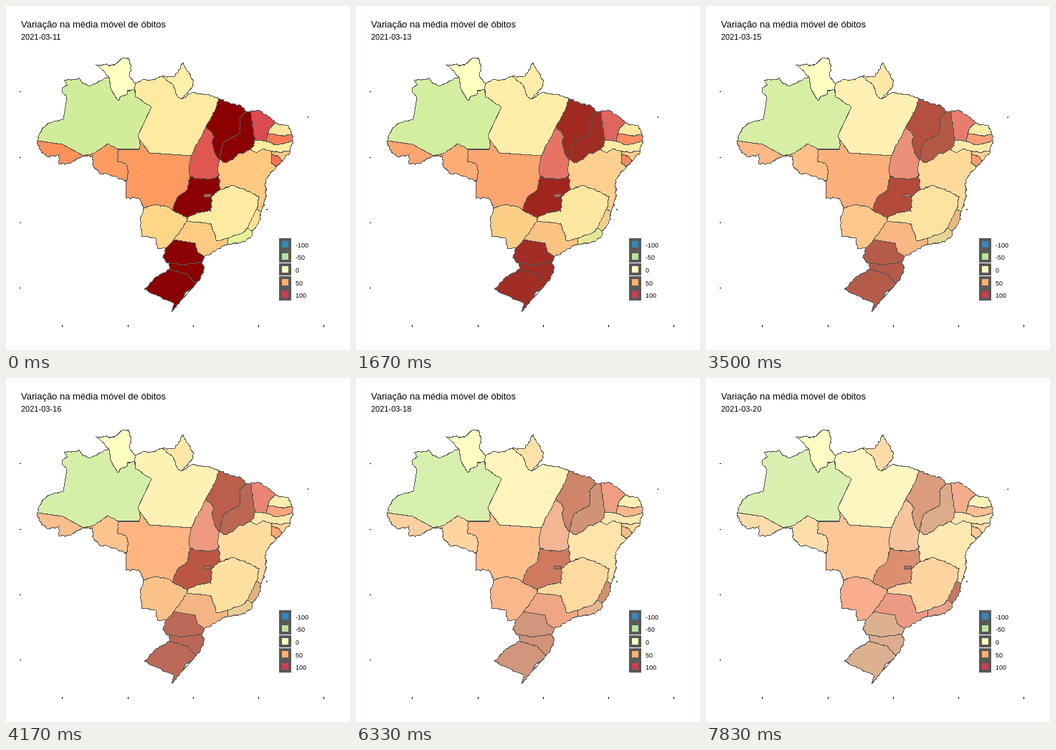
Animation of 480 by 480 pixels, one loop 8000 ms. Source, as an HTML page:

```html
<!DOCTYPE html>
<html lang="pt">
<head>
<meta charset="utf-8">
<style>
html, body { margin: 0; width: 100%; height: 100%; overflow: hidden; background: #fff; }
svg { display: block; width: 100%; height: 100%; }
text { font-family: "Liberation Sans", Arial, sans-serif; fill: #000; }
</style>
</head>
<body>
<svg id="stage" viewBox="0 0 480 480">
  <text x="21" y="30" font-size="13">Variação na média móvel de óbitos</text>
  <text id="date" x="21" y="47" font-size="11"></text>
  <g id="map" shape-rendering="crispEdges"></g>
  <g id="guides" shape-rendering="crispEdges"></g>
</svg>
<script>
// Points where borders meet, each named by a letter.
const corners = `A43,188 B50,205 C108,209 D143,98 E180,117 F180,108 G218,98 H247,79 I245,130
  J297,129 K279,168 L259,209 M187,187 N156,200 O168,244 P192,282 Q232,285 R257,238 S297,237
  T298,214 U335,147 V341,147 W347,187 X341,200 Y376,163 Z365,178 a363,189 b399,179 c400,188
  d397,202 e369,202 f386,216 g371,207 h377,225 i356,287 j350,283 k298,257 l253,295 m252,301
  n309,324 o336,310 p344,314 q309,333 r277,350 s234,326 t223,338 u227,359 v274,357 w265,388
  x228,367 y231,427`;

// Key bends on the way from one corner to the next; other borders run directly.
const bends = {
  AD: '50,172 62,163 80,158 85,128 79,121 79,114 86,110 81,104 97,103 102,100 107,108 116,112 133,104',
  DF: '132,87 126,82 152,82 164,72 171,73 175,84 172,98',
  DE: '147,117 156,132 161,126 168,124 170,118',
  EM: '181,127 203,141 184,181',
  MN: '186,200',
  NC: '143,192 134,198 124,205',
  CA: '79,193',
  CB: '88,220 74,220 74,207 59,211',
  FG: '190,103 207,103',
  GI: '233,110 239,126',
  GH: '236,98',
  HI: '252,90 262,104 261,111',
  IJ: '260,120 280,123',
  JK: '291,147',
  KL: '271,185 266,193',
  LM: '200,205',
  NO: '156,217 167,220 171,230',
  OC: '143,235 131,234 122,224 121,209',
  OP: '168,268 185,268',
  PQ: '207,277 225,280',
  QR: '239,267 253,256',
  RL: '255,227',
  RS: '270,241 291,241',
  ST: '295,226',
  KT: '291,182 287,190 291,205',
  JU: '313,136 328,139',
  UT: '326,158 327,177 304,190 300,202',
  VW: '344,165',
  WX: '346,195',
  XT: '331,206 326,205 317,214 305,219',
  VY: '352,145 366,154',
  YZ: '368,171',
  Yb: '383,166 394,167',
  bZ: '385,181',
  ca: '378,194',
  de: '380,204',
  eX: '358,199 350,205',
  fg: '379,209',
  hg: '370,219',
  hi: '362,243 363,266',
  jk: '353,266 330,255 315,250',
  kl: '287,266 286,286 268,288',
  jo: '346,291',
  on: '331,316',
  nm: '294,328 286,304 268,302',
  ip: '355,298',
  pq: '343,321 333,329',
  qr: '294,340',
  rs: '268,344 264,331',
  ms: '243,314',
  tP: '211,338 209,324 189,321 187,299',
  ut: '219,351',
  uv: '250,361',
  vw: '276,372',
  xw: '253,374',
  xy: '209,378 193,395 206,402 223,410 235,416',
  wy: '243,412'
};

// Corners around each state, then its first and last colour.
const states = `
  ADEMNC d2ed99 d9f0b0
  DFE ffffbf fefec2
  FGIJKLME feeaa1 fef6c1
  GHI fef0a8 fddca5
  ACB fd915c fcdcab
  CNO fd9c61 fedfaa
  NMLRQPO fd9a60 fec595
  KTSRL e0574f f6c59e
  JUTK 8b0000 da9c7c
  UVWXT 8b0000 dcac8a
  VYZaW dc4a50 f4ad8b
  YbZ fee59a fef2b8
  bcaZ f67a54 fcbf92
  cdeXWa ffeda0 fee6b0
  dfge fec880 fddaa5
  fhg f4724f fcc896
  hijkSTXeg fec880 fee8b2
  RSklQ 8b0000 db8f70
  kjonml feeaa0 fed5a0
  ipoj fee094 c37a62
  opqn e6f598 e9a18c
  mnqrs fecb82 eb9a84
  PQlmst fed685 f8ad8c
  srvut 8b0000 ddb090
  uvwx 8b0000 dcac8d
  xwy 8b0000 ddb090`.trim().split('\n').map(row => row.trim().split(' '));

const $ = id => document.getElementById(id);
function add(parent, tag, attrs) {
  const node = document.createElementNS(parent.namespaceURI, tag);
  for (const key in attrs) node.setAttribute(key, attrs[key]);
  return parent.appendChild(node);
}
const noise = (x, y) => {
  const v = Math.sin(x * 12.9898 + y * 78.233) * 43758.5453;
  return (v - Math.floor(v)) * 2 - 1;
};
const toPoint = text => text.split(',').map(Number);
const toPath = points => 'M' + points.map(p => p.map(n => n.toFixed(1)).join(' ')).join('L');

// Gives short stretches a ragged edge; long ones are ruled lines and stay straight.
function roughen(points, amount) {
  const out = [points[0]];
  for (let i = 1; i < points.length; i++) {
    const [ax, ay] = points[i - 1], [bx, by] = points[i];
    const length = Math.hypot(bx - ax, by - ay);
    const pieces = length > 28 ? 1 : Math.max(1, Math.round(length / 3));
    for (let k = 1; k < pieces; k++) {
      const x = ax + (bx - ax) * k / pieces, y = ay + (by - ay) * k / pieces;
      const shift = noise(x, y) * amount / length;
      out.push([x - (by - ay) * shift, y + (bx - ax) * shift]);
    }
    out.push(points[i]);
  }
  return out;
}

const corner = {};
for (const item of corners.split(/\s+/)) corner[item[0]] = toPoint(item.slice(1));

const edgesOf = ring => [...ring].map((from, i) => from + ring[(i + 1) % ring.length]);
const flip = edge => edge[1] + edge[0];
const allEdges = new Set(states.flatMap(([ring]) => edgesOf(ring)));

// A border is outer when no neighbour walks it the other way.
const lines = {};
for (const edge of allEdges) {
  if (lines[edge]) continue;
  const key = bends[flip(edge)] ? flip(edge) : edge;
  const middle = bends[key] ? bends[key].split(' ').map(toPoint) : [];
  const points = [corner[key[0]], ...middle, corner[key[1]]];
  const line = roughen(points, allEdges.has(flip(edge)) ? 0.8 : 1.2);
  lines[key] = line;
  lines[flip(key)] = [...line].reverse();
}

const map = $('map'), guides = $('guides');
const ink = { fill: 'none', stroke: '#555', 'stroke-width': 1.1 };
const rgb = hex => [0, 2, 4].map(i => parseInt(hex.slice(i, i + 2), 16));
const sum = colour => colour.reduce((a, b) => a + b);

const areas = [];
function addArea(attrs, first, last) {
  const from = rgb(first), to = rgb(last);
  // Fading colours run ahead of an even pace, deepening ones lag behind it.
  const lead = sum(to) > sum(from) ? 0.28 : -0.28;
  areas.push({ node: add(map, 'path', attrs), from, to, lead });
}
for (const [ring, first, last] of states) {
  addArea({ d: toPath(edgesOf(ring).flatMap(edge => lines[edge])) + 'Z' }, first, last);
}
add(map, 'path', { ...ink, d: Object.values(lines).map(toPath).join('') });
addArea({ ...ink, 'stroke-width': 1, d: 'M276.5 262.5H286.5L285.5 266.5H276.5Z' }, 'd85844', 'b96a5c');
// Lagoon and islands
add(map, 'path', { ...ink, fill: '#fff', d: 'M256 396L253 402L247 406L251 399Z' });
add(map, 'path', { ...ink, d: 'M420 155.5H422M421 154.5H422M364 283V285' });

for (let i = 0; i < 5; i++) {
  const offset = Math.ceil(i * 91.25);
  add(guides, 'rect', { x: 78 + offset, y: 445, width: 1, height: 3 });
  if (i < 4) add(guides, 'rect', { x: 19, y: 119 + offset, width: 2, height: 1 });
}
['#3288bd', '#b8e29b', '#ffffbf', '#fdb16a', '#ce3d4d'].forEach((fill, i) => {
  const y = 324 + Math.floor(i * 17.67);
  add(guides, 'rect', { x: 381, y, width: 17, height: 17, fill: '#595959' });
  add(guides, 'rect', { x: 385, y: y + 4, width: 9, height: 9, fill });
  add($('stage'), 'text', { x: 404, y: y + 13, 'font-size': 9 }).textContent = i * 50 - 100;
});

const LOOP = 8000, STEPS = 48;
function draw(time) {
  const step = Math.floor((time % LOOP) / LOOP * STEPS + 0.025);
  $('date').textContent = '2021-03-' + (11 + Math.floor(0.1 + step * 0.2));
  const part = step / (STEPS - 1);
  for (const { node, from, to, lead } of areas) {
    const eased = part + lead * part * (1 - part);
    const mix = from.map((c, i) => Math.round(c + (to[i] - c) * eased));
    node.setAttribute('fill', `rgb(${mix})`);
  }
}
const start = performance.now();
function tick() {
  draw(performance.now() - start);
  requestAnimationFrame(tick);
}
tick();
</script>
</body>
</html>
```
